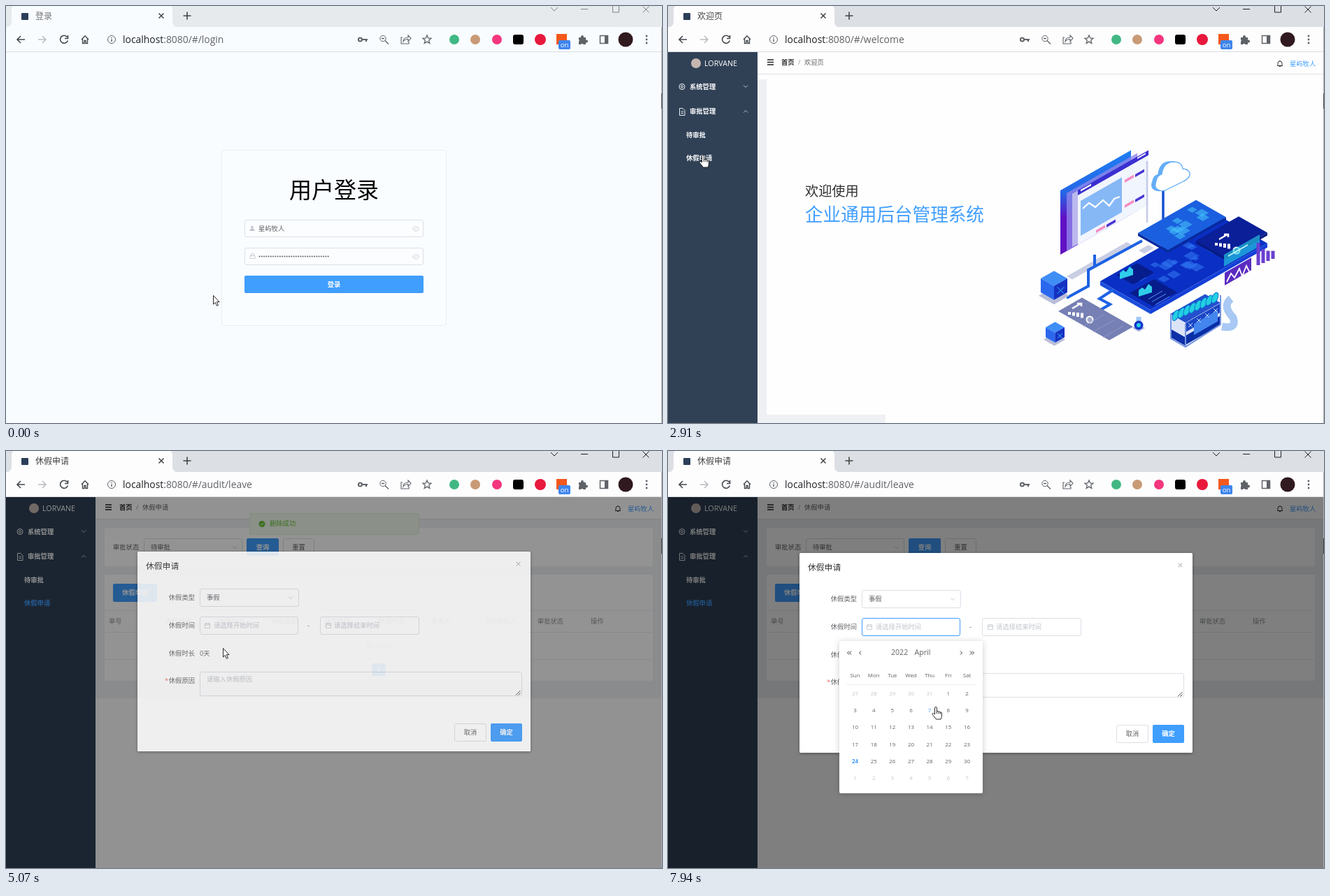
An HTML page that plays this animation: 938 by 597 pixels, repeating every 8 s.

```html
<!DOCTYPE html>
<html lang="zh-CN">
<head>
<meta charset="utf-8">
<title>休假申请</title>
<style>
html, body { margin: 0; height: 100%; overflow: hidden; background: #fff }
svg { display: block; width: 100vw; height: 100vh }
text { font-family: "Open Sans", "Noto Sans CJK SC", "Noto Sans CJK", sans-serif; white-space: pre }
</style>
</head>
<body>
<svg id="stage" viewBox="0 0 938 597"></svg>
<script>
const BLUE = '#409eff', GREY = '#606266', PALE = '#c0c4cc', EDGE = '#dcdfe6', ICON = '#5f6368';
const MID = 'text-anchor="middle"', END = 'text-anchor="end"', BOLD = 'font-weight="700"';
const USER = '星屿牧人';

// Drawing helpers; y of a text is its vertical centre
const repeat = (n, make) => Array.from({ length: n }, (_, i) => make(i)).join('');
const text = (x, y, s, fill = GREY, size = 9.3, extra = '') =>
  `<text x="${x}" y="${y + size * .37}" fill="${fill}" font-size="${size}" ${extra}>${s}</text>`;
const box = (x, y, w, h, fill, stroke, r = 0, extra = '') => {
  const o = stroke ? .5 : 0;
  return `<rect x="${x + o}" y="${y + o}" width="${w - 2 * o}" height="${h - 2 * o}" rx="${r}" fill="${fill}" stroke="${stroke || 'none'}" ${extra}/>`;
};
const path = (d, stroke = ICON, w = 1.5, fill = 'none', extra = '') =>
  `<path d="${d}" stroke="${stroke}" stroke-width="${w}" fill="${fill}" ${extra}/>`;
const dot = (x, y, r, fill, stroke = 'none', w = 1) =>
  `<circle cx="${x}" cy="${y}" r="${r}" fill="${fill}" stroke="${stroke}" stroke-width="${w}"/>`;
const group = (id, ...parts) => `<g id="${id}">${parts.join('')}</g>`;
const chevron = (x, y, color, dir = 1) => path(`M${x - 3} ${y - 1.5 * dir}l3 ${3 * dir} 3 ${-3 * dir}`, color, .9);
const angle = (x, y, dir) => path(`M${x - dir} ${y - 2.5}l${2.5 * dir} 2.5 ${-2.5 * dir} 2.5`, '#303133', 1);
const cross = (x, y, r, color, w = 1) => path(`M${x - r} ${y - r}l${2 * r} ${2 * r}m0 ${-2 * r}l${-2 * r} ${2 * r}`, color, w);
const button = (x, y, w, h, label, fill, size = 9.3, extra = '') =>
  box(x, y, w, h, fill || '#fff', fill ? '' : EDGE, 2, extra) +
  text(x + w / 2, y + h / 2, label, fill ? '#fff' : GREY, size, `${MID} ${fill ? BOLD : ''}`);
const field = (x, y, w, label, color, dx = 10, extra = '') =>
  box(x, y, w, 26, '#fff', EDGE, 2.5, extra) + text(x + dx, y + 13, label, color);
const calendar = (x, y) => path(`M${x - 3.5} ${y - 3}h7v6.5h-7zm0 2.2h7m-5-3.4v2m3-2v2`, PALE, .8);

const browser = () => [
  box(0, 0, 938, 30, '', '', 0, 'id="strip"'),
  path('M0 31Q8 30 8 22V6Q8-2 16-2H230Q238-2 238 6V22Q238 30 246 31Z', 'none', 0, '', 'class="bar"'),
  box(0, 30, 938, 36, '', '', 0, 'class="bar"'),
  box(0, 65, 938, 1, '#dadce0'),
  box(22, 10, 10, 10, '#2c3e58', '', 1),
  text(42, 15, '', '', 12, 'id="title"'),
  cross(222, 14, 3.5, '#444', 1.5), path('M253.5 14h11m-5.5-5.5v11', '#444', 1.6),
  group('controls', path('M779 2l5 5 5-5M822 4.5h10M867.5-1v10h9v-10', '#222', 1), cross(915, 5, 4.5, '#222')),
  path('M27 48H16m5-5l-5 5 5 5', '#45494d', 1.6), path('M46 48h11m-5-5l5 5-5 5', '#b9bcc0'),
  path('M87.5 44.5a5.5 5.5 0 1 0 .8 5M88.5 42v4.5h-4.5', '#45494d', 1.6),
  path('M108 48l5-5.2 5 5.2M109.5 47v6.5h2.5v-4h2v4h2.5V47', '#45494d', 1.4),
  dot(151, 48, 5.5, 'none', ICON), path('M151 47.5v3.5m0-6v1.3'),
  text(167, 48, '<tspan fill="#202124">localhost</tspan>:8080/#/<tspan id="route"></tspan>', GREY, 13.9),
  path('M509 48h8m-2 0v3', ICON, 2.2), dot(506.5, 48, 2.6, 'none', ICON, 2),
  dot(539, 46.5, 4.2, 'none', ICON), path('M542 49.5l5 5M537 46.5h4', ICON, 1.4),
  path('M567 45h-2v9h11v-3M568 51q0-6 7-6v-3l4 4.3-4 4.2v-3q-5 0-7 3.5z', ICON, 1.1),
  path('M602 42l1.7 4 4.3.3-3.3 2.8 1.1 4.3-3.8-2.3-3.8 2.3 1.1-4.3-3.3-2.8 4.3-.3z', ICON, 1.3),
  dot(641, 48, 7, '#41b883'), dot(671, 48, 7, '#c99a76'), dot(702, 48, 7, '#f4367e'),
  box(725, 41, 15, 14, '#000', '', 3), dot(764, 48, 8, '#e8193c'),
  box(787, 40, 15, 15, '#f4581c'), box(790, 49, 17, 13, '#3f85ee', '', 2), text(798.5, 55.5, 'on', '#fff', 9.5, MID),
  path('M819 45h3v-1a2 2 0 0 1 4 0v1h3v3.5h1a2 2 0 0 1 0 4h-1V55h-3.5a2 2 0 0 0-3.5 0h-3v-4a2 2 0 0 0 0-3z', 'none', 0, ICON),
  path('M849.5 42.5h11v11h-11z'), box(856, 42, 5, 12, ICON),
  dot(886, 48, 10.5, '#30191f'),
  repeat(3, i => dot(916, 43 + 5 * i, 1.4, ICON))
].join('');

const login = () => {
  const input = y => box(341, y, 256, 25, '#fbfdff', EDGE, 2.5) +
    path(`M584 ${y + 10}h4l2 2v2l-2 2h-4l-2-2v-2zm0 2.500l1.500 1.500 2.500-2.500`.replace(/00\b/g, ''), PALE, .7);
  return box(0, 66, 938, 531, '#f9fcff') + box(308, 206, 322, 252, '#fafdff', '#eaedf3', 4) +
    text(469, 263, '用户登录', '#000', 32, MID) + input(306) + input(346) +
    dot(352, 316.5, 1.8, PALE) + path('M348.5 322q0-3.5 3.5-3.5t3.5 3.5z', 'none', 0, PALE) +
    path('M349 357.5h7v4h-7zm1.5 0v-1.5a2 2 0 0 1 4 0v1.5', PALE, .8) +
    text(361, 318.5, USER) +
    path('M362.5 358.5h98.5', GREY, 2.1, 'none', 'stroke-linecap="round" stroke-dasharray="0 3.27"') +
    button(341, 386, 256, 25, '登录', BLUE, 9.3, 'id="enter"');
};

const frame = () => {
  const arrow = '#cdd3da', item = (x, y, s, extra = '') => text(x, y, s, '#fff', 9.3, `${BOLD} ${extra}`);
  return box(128, 66, 809, 531, '#fefefe') + box(0, 66, 128, 531, '#304156') +
    dot(40, 82, 7, '#c5b7b0') + text(52, 82, 'LORVANE', '#fff', 10.7) +
    dot(20, 115.5, 4, 'none', '#fff') + dot(20, 115.5, 1.5, 'none', '#fff') +
    item(31, 115.5, '系统管理') + chevron(111, 115, arrow) +
    path('M16.5 146.5h4.5l3 3v7h-7.5zM18.5 151h3.5m-3.5 2.5h3.5', '#fff', .9) + item(31, 151, '审批管理') +
    group('closed', chevron(111, 151, arrow)) +
    group('submenu', chevron(111, 151, arrow, -1), item(26, 185, '待审批'), item(26, 217.5, '休假申请', 'id="leaveItem"')) +
    box(128, 97, 809, 1, '#dfe1e6') + path('M142 77h9m-9 3.5h9m-9 3.5h9', '#222', 1.4) +
    text(162, 81, '首页', '#303133', 9.3, BOLD) + text(186, 81, '/', '#909399') + text(195, 81, '', GREY, 9.3, 'id="crumb"') +
    path('M871 85.5h8m-7 0v-3.5a3 3 0 0 1 6 0v3.5m-3-7.5v1m-1 7.5h2', '#333', 1) + text(889, 83, USER, BLUE);
};

// Isometric pieces: a runs right and up, b runs right and down
const SLOPE = .57;
const poly = (points, fill, opacity = 1) => `<polygon points="${points.join(' ')}" fill="${fill}" opacity="${opacity}"/>`;
const floor = (x, y, a, b, fill, opacity) =>
  poly([[0, 0], [a, 0], [a, b], [0, b]].map(([p, q]) => [x + p + q, y + (q - p) * SLOPE]), fill, opacity);
const wall = (x, y, w, h, fill, opacity, dir = -1) =>
  poly([[x, y], [x + w, y + dir * w * SLOPE], [x + w, y + dir * w * SLOPE + h], [x, y + h]], fill, opacity);
const slab = (x, y, a, b, h, top, left, right) =>
  floor(x, y, a, b, top) + wall(x, y, b, h, left, 1, 1) + wall(x + b, y + b * SLOPE, a, h, right);
const cube = (x, y, r) => floor(x - 3, y + r * 1.3, r * 1.15, r * 1.15, '#b9bfda') +
  slab(x, y, r, r, r * 1.05, '#3f8ef6', '#2b68ee', '#1531c2') + cross(x + r * 1.5, y + r * .9, r * .25, '#3bb8ff');
const barIcons = (x, y) => repeat(4, i => path(`M${x + i * 6} ${y + i * 1.5}v${-4 - i}`, '#fff', 4)) +
  path(`M${x + 4} ${y - 9}l12-7m-5 0h6v4`, '#fff', 2.5) + dot(x + 29, y + 7, 4.5, '#fff5', '#fff', 2);

let seed = 7;
const random = () => (seed = seed * 16807 % 2147483647) / 2147483647;
// Loose square tiles on a plate
const scatter = (n, x, y, a, b, fill) => repeat(n, () => {
  const p = random() * a, q = random() * b, size = 5 + random() * 7;
  return floor(x + p + q, y + (q - p) * SLOPE, size, size, fill, .6);
});
const areaChart = (x, y) => path(`M${x} ${y}v-9l5-4 4 3 5-8 5 4v8z`, 'none', 0, '#2fcdea');

const artwork = () => [
  '<linearGradient id="panel" x2="0" y2="1"><stop stop-color="#1f7df2"/><stop offset=".4" stop-color="#2468e8"/><stop offset=".65" stop-color="#6110c4"/></linearGradient>',
  wall(561, 264, 101, 92, 'url(#panel)'),
  wall(570, 268, 101, 83, '#8f86ea', .8), wall(578, 269, 101, 76, '#c2c0f0', .9), wall(586, 268, 101, 74, '#f1f5fd'),
  wall(586, 264, 101, 7, '#3b2fd0'), wall(590, 263, 15, 2.5, '#fff'), wall(671, 217, 12, 2, '#fff'),
  path('M685 222v88', '#c5cbea', 2.5), wall(590, 279, 59, 50, '#86b8f6'),
  path('M593 290l9-8 9 6 11-10 9 8 7-10 8-3', '#fff', 2.2),
  repeat(3, i => {
    const x = i < 2 ? 653 : 612, y = 249 + 36 * i;
    return wall(x, y, 13, 4, '#f58ac4') + wall(x + 15, y - 8, 13, 4, '#4a35d2');
  }),
  path('M708 261v45', '#1450d2', 3.5),
  ...['#64aef8', '#fff'].map((fill, i) =>
    path(`M${698 + 5 * i} 264q-9-3-5-13 1-8 8-10 2-17 16-18 13 0 14 10 11 1 10 9-1 5-9 9l-22 11q-6 4-12 2z`, '#64aef8', 1.3, fill)),
  floor(570, 387, 86, 8, '#c9cee3'), floor(673, 350, 14, 8, '#c9cee3'),
  path('M678 336l-77 42v23l-31 17m40-62v17', '#1d62e3', 4),
  slab(618, 394, 167, 72, 6, '#0a2fc4', '#1b4fdc', '#1440d8'),
  scatter(16, 650, 386, 100, 40, '#2f77f2'),
  slab(672, 325, 83, 43, 4, '#1a5fdf', '#072a9e', '#072a9e'), scatter(10, 684, 323, 62, 28, '#45bff8'),
  slab(755, 336, 61, 41, 4, '#0a1f98', '#071a80', '#071a80'), barIcons(784, 343),
  wall(795, 356, 51, 17, '#28d9e8', .6), wall(801, 357, 28, 2, '#bff8ff'),
  floor(641, 385, 30, 24, '#071d8c'), areaChart(646, 391), floor(660, 411, 35, 33, '#071d8c'), areaChart(673, 416),
  repeat(3, i => wall(687 + 5 * i, 419 + 4 * i, 20, 1, '#5a92f8')),
  repeat(4, i => path(`M${844 + i * 7} ${371 - i * 3}v${-32 / (1 + i * .6)}`, '#6a3fd0', 5)),
  wall(796, 382, 38, 18, '#5a2bc0'), path('M799 395l6-12 5 6 7-13 4 11 6-15 4 8', '#fff', 1.8),
  path('M637 406l-20 13 15 8-20 12', '#1d62e3', 4),
  cube(533, 390, 19), cube(540, 460, 13.5),
  floor(558, 437, 34, 73, '#7680b4'), barIcons(574, 442),
  repeat(3, i => wall(594 + 14 * i, 458 + 8 * i, 30, 1, '#8f98c6')),
  floor(664, 461, 9, 9, '#aab5e2'), path('M673 445v8', '#9cc9f5', 7), dot(673, 457, 6.5, '#1535c8'), dot(673, 457, 3, '#27d3e8'),
  path('M792 459q22 4 16-13-16-17-3-27', '#a9c9f4', 11),
  slab(718, 441, 50, 22, 33, '#2450cf', '#dbe3f8', '#dbe3f8'),
  wall(740, 454, 50, 13, '#1b45c4'), wall(740, 472, 50, 13, '#0b2fa6'), wall(752, 455, 34, 16, '#4385ee'),
  wall(718, 462, 22, 12, '#0b2fa6', 1, 1),
  repeat(8, i => `<g transform="translate(${726 + i * 8} ${443 - i * 3.6}) rotate(25)"><ellipse rx="4" ry="8" fill="#22cfe2" stroke="#0c73cf"/></g>`),
  repeat(4, i => cross(747 + i * 12, 457 - i * 7, 3, '#bfe0ff')),
  path('M719 441v35l21 12 50-32v-42M740 455v33', '#7595df', 2)
].join('');

const welcome = () => box(128, 105, 13, 492, '#eef0f4') + box(141, 585, 170, 12, '#eef0f4') +
  text(196, 265, '欢迎使用', '#303133', 19.2) + text(196, 298.5, '企业通用后台管理系统', BLUE, 25.6) + artwork();

const COLUMNS = ['单号', '休假时间', '休假时长', '休假类型', '休假原因', '申请时间', '审批人', '当前审批人', '审批状态', '操作'];
const ROW = ['XJ202204242', '2022-04-24至|2022-04-24', '11天', '事假', 'ccc', '2022-04-24 2|2:17:38', '禾月,木知遥', '禾月', '待审批'];

const leave = hasRow => {
  const bottom = hasRow ? 305 : 298;
  const rule = y => box(141, y, 784, 1, '#ebeef5');
  const cell = (column, y, s, color) => {
    const lines = s.split('|');
    return lines.map((part, i) =>
      text(column ? 151.5 + 76.05 * column : 147, y + 15.5 * (i - (lines.length - 1) / 2), part, color)).join('');
  };
  return box(128, 98, 809, bottom - 42, '#eef0f4') + box(141, 110, 784, 55, '#fff', '', 2) +
    box(141, 177, 784, bottom - 146, '#fff', '', 2) +
    text(153, 138, '审批状态') + field(197, 125, 141, '待审批', GREY) + chevron(327, 138, PALE) +
    button(344, 125, 46, 25, '查询', BLUE) + button(396, 125, 45, 25, '重置') + button(153, 190, 63, 26, '休假申请', BLUE) +
    rule(228) + rule(259) + rule(bottom) +
    COLUMNS.map((s, i) => cell(i, 244, s, '#909399')).join('') +
    (hasRow ? ROW.map((s, i) => cell(i, 282.5, s)).join('') +
      button(836, 274, 36, 17, '查看', '', 8) + button(878, 274, 36, 17, '作废', '#f56c6c', 8, 'id="discard"')
      : text(533, 279, 'No Data', '#909399', 9.3, MID)) +
    repeat(3, i => box(498 + 25.5 * i, bottom + 6, 19, 18, i == 1 ? BLUE : '#f4f4f5', '', 1.5)) +
    text(532.5, bottom + 15, '1', '#fff', 8.7, `${MID} ${BOLD}`) +
    path(`M508.5 ${bottom + 12.5}l-2.5 2.5 2.5 2.5m49-5l2.5 2.5-2.5 2.5`, PALE, .9);
};

const message = () => box(348, 89, 243, 31, '#f0f9eb', '#e1f3d8', 2.5) + dot(366, 104.5, 4.5, '#67c23a') +
  path('M363.7 104.5l1.7 1.7 3-3', '#fff', 1) + text(377, 104, '删除成功', '#67c23a');

const dialog = () => [
  box(188, 146, 562, 286, '#fff', '', 1.5, 'filter="drop-shadow(0 1px 2px #0006)"'),
  text(200, 167, '休假申请', '#303133', 11.8), cross(732.5, 163.5, 2.8, '#909399', .9),
  ['类型', '时间', '时长', '原因'].map((s, i) => text(270, 212 + 39.6 * i, '休假' + s, GREY, 9.3, END)).join(''),
  text(227, 331, '*', '#f56c6c'),
  field(277, 199, 142, '事假', GREY, 10, 'id="kind"'),
  group('kindDown', chevron(407, 212, PALE)), group('kindUp', chevron(407, 212, PALE, -1)),
  field(277, 239, 141, '请选择开始时间', PALE, 20, 'id="start"'), calendar(288, 252),
  text(431, 252, '-'), field(449, 239, 142, '请选择结束时间', PALE, 20), calendar(461, 252),
  text(277, 291.5, '0天'),
  box(277, 318, 461, 35, '#fff', EDGE, 2.5), text(287, 329, '请输入休假原因', PALE), path('M729 351.5l6.5-6.5m-3 6.5l3-3', '#444', 1),
  button(641, 392, 46, 26, '取消'), button(693, 392, 45, 26, '确定', BLUE)
].join('');

const SHADOW = 'filter="drop-shadow(0 1px 4px #0003)"';
const options = () => box(277, 232, 143, 74, '#fff', '#e4e7ed', 2.5, SHADOW) + path('M343 233l4.5-4 4.5 4', '#e4e7ed', 1, '#fff') +
  ['事假', '调休', '年假'].map((s, i) => text(290, 247 + 21.8 * i, s, i ? GREY : BLUE, 9.3, i ? '' : BOLD)).join('');

const TODAY = 28, dayX = i => 267.5 + 26.65 * (i % 7), dayY = i => 347 + 24.25 * Math.floor(i / 7);
const dayOf = i => new Date(2022, 2, 27 + i);
const picker = () => box(245, 272, 205, 218, '#fff', '', 2.5, SHADOW) +
  angle(258, 289, -1) + angle(261, 289, -1) + angle(275, 289, -1) + angle(419, 289, 1) + angle(433, 289, 1) + angle(436, 289, 1) +
  text(319, 288.5, '2022', GREY, 10.6) + text(352.5, 288.5, 'April', GREY, 10.6) +
  ['Sun', 'Mon', 'Tue', 'Wed', 'Thu', 'Fri', 'Sat'].map((s, i) => text(dayX(i), 321.5, s, GREY, 7.9, MID)).join('') +
  box(255, 334, 185, 1, '#ebeef5') +
  repeat(42, i => text(dayX(i), dayY(i), dayOf(i).getDate(), GREY, 7.9, `${MID} class="day" ${i == TODAY ? BOLD : ''}`));

document.getElementById('stage').innerHTML = browser() + group('login', login()) +
  group('app', frame(), group('welcome', welcome()), group('full', leave(true)), group('empty', leave(false)),
    group('message', message()), box(0, 66, 938, 531, '#000', '', 0, 'id="mask"'),
    group('dialog', dialog()), group('options', options()), group('picker', picker())) +
  box(937, 30, 1, 567, '#a9abae') + box(937, 125, 1, 22, '#444') +
  group('cursor',
    group('arrow', path('M.5.5V13L3.3 10.4 5.4 15.2 7.5 14.3 5.4 9.6H9z', '#111', .9, '#fff')),
    group('hand', path('M-1.5 11V1.3Q0-.7 1.4 1.3V7Q2.8 5.6 4.2 7.3 5.6 6.3 6.6 8 8 7.4 8.4 9.2V13Q8.3 15.5 7 18H.3Q-2 14.5-4.8 11.5-5.4 9.6-3.6 9.4-2.4 9.7-1.5 11zM1.4 7v3m2.8-2.7v3M6.6 8v2.5', '#111', .9, '#fff')));

const $ = id => document.getElementById(id);
const set = (id, name, value) => $(id).setAttribute(name, value);
const show = (id, on) => set(id, 'opacity', +on);
const days = [...document.querySelectorAll('.day')], bars = document.querySelectorAll('.bar');

// Where the pointer arrives and when; click marks things that turn it into a hand
const stop = (at, x, y, click = true) => ({ at, x, y, click });
const STOPS = [
  stop(0, 296, 414, false), stop(980, 510, 404), stop(1980, 98, 140), stop(2890, 50, 213), stop(3600, 895, 283),
  stop(4200, 303, 246, false), stop(4650, 190, 204), stop(5070, 310, 282, false), stop(5430, 316, 314, false),
  stop(6200, 399, 218), stop(7050, 330, 246), stop(7700, 375, 357), stop(7940, 383, 366), stop(8000, 383, 366)
];
const TRAVEL = 700, HOLD = 130, LOOP = 8000;
const ramp = (t, start, length = 300) => 1 - (1 - Math.min(1, Math.max(0, (t - start) / length))) ** 2;

function draw(time) {
  const n = STOPS.findLastIndex(s => s.at <= time), from = STOPS[n], to = STOPS[n + 1];
  const gap = to.at - from.at, step = gap / Math.max(1, Math.round(gap / HOLD));
  const t = from.at + Math.floor((time - from.at) / step) * step;

  const u = Math.max(0, 1 - (to.at - t) / Math.min(gap, TRAVEL)), eased = u * u * (3 - 2 * u);
  const x = from.x + (to.x - from.x) * eased, y = from.y + (to.y - from.y) * eased;
  const hand = eased < .1 ? from.click : eased > .6 && to.click;
  set('cursor', 'transform', `translate(${x} ${y})`);
  show('hand', hand);
  show('arrow', !hand);

  const focused = t > 850, inside = t > 1550, onLeave = t > 3000, deleted = t > 4340;
  $('title').textContent = $('crumb').textContent = onLeave ? '休假申请' : inside ? '欢迎页' : '登录';
  $('route').textContent = onLeave ? 'audit/leave' : inside ? 'welcome' : 'login';
  set('strip', 'fill', focused ? '#dcdfe4' : '#e7eaed');
  set('title', 'fill', focused ? '#444' : '#777');
  show('controls', focused ? 1 : .5);
  bars.forEach(bar => bar.setAttribute('fill', inside ? '#fdfdfe' : '#f9fcff'));

  show('login', !inside);
  show('app', inside);
  show('welcome', !onLeave);
  show('full', onLeave && !deleted);
  show('empty', deleted);
  set('enter', 'fill', hand && !inside ? '#66b1ff' : BLUE);
  show('closed', t < 2370);
  show('submenu', ramp(t, 2300));
  set('leaveItem', 'fill', onLeave ? BLUE : '#fff');
  set('discard', 'fill', t > 3550 ? '#f78989' : '#f56c6c');

  const notice = ramp(t, 4100) - ramp(t, 7100);
  show('message', notice);
  set('message', 'transform', `translate(0 ${-30 * (1 - notice)})`);
  const opened = ramp(t, 4886);
  show('mask', opened / 2);
  show('dialog', opened);
  set('dialog', 'transform', `translate(0 ${-13.4 * (1 - opened)})`);

  const choosing = t > 6170 && t < 7050;
  show('options', ramp(t, 6150, 200) - ramp(t, 7000, 200));
  show('kindUp', choosing);
  show('kindDown', !choosing);
  set('kind', 'stroke', choosing ? BLUE : EDGE);
  set('start', 'stroke', t > 7150 ? BLUE : EDGE);
  show('picker', ramp(t, 7150, 200));
  days.forEach((day, i) => {
    const hover = Math.abs(x - dayX(i)) < 13 && Math.abs(y - dayY(i)) < 12;
    day.setAttribute('fill', dayOf(i).getMonth() != 3 ? PALE : hover || i == TODAY ? BLUE : GREY);
  });
}

const begin = performance.now();
(function tick() {
  draw((performance.now() - begin) % LOOP);
  requestAnimationFrame(tick);
})();
</script>
</body>
</html>
```
